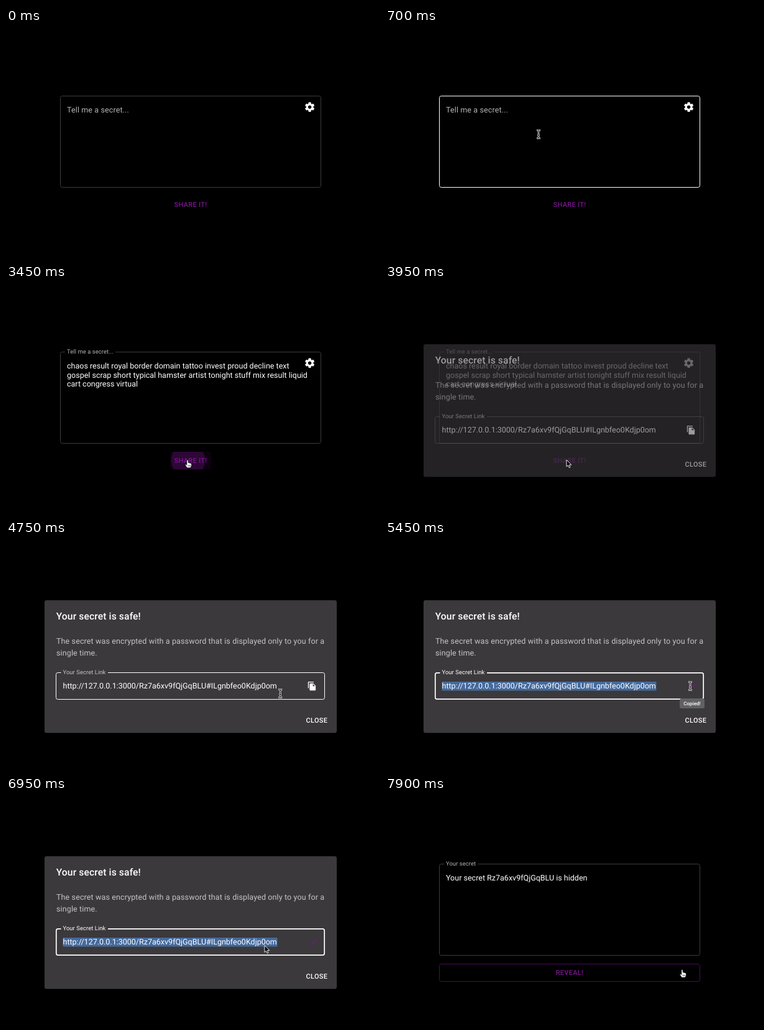
An HTML page for the animation above (8 s loop, 600x367 px).

```html
<!DOCTYPE html>
<html lang="en">
<head>
<meta charset="utf-8">
<title>Secret sharing</title>
<style>
html, body { margin: 0; width: 100%; height: 100%; overflow: hidden; background: #000; }
svg { display: block; width: 100%; height: 100%; }
text { font: 12.52px Roboto, Arial, sans-serif; fill: #fff; text-rendering: geometricPrecision; white-space: pre; }
.body { letter-spacing: .117px; fill-opacity: .7; }
.label { font-size: 9.39px; letter-spacing: .088px; }
.soft { fill-opacity: .7; }
.title { font-size: 15.64px; font-weight: 500; letter-spacing: .117px; }
.button { font-size: 10.95px; font-weight: 500; letter-spacing: .313px; }
.tip { font-size: 8px; font-weight: 500; }
.menu { font: 10.5px Inter, Roboto, sans-serif; }
.purple { fill: #7b1591; }
.mid { text-anchor: middle; }
.line { fill: none; }
</style>
</head>
<body>
<svg viewBox="0 0 600 367">
  <defs>
    <clipPath id="shareBox"><rect x="264" y="270" width="66" height="28.5" rx="3"/></clipPath>
    <path id="tooth" d="M-2.1-9.5H2.1L2.7-6H-2.7Z" fill="#fff" stroke="#fff" stroke-width=".7" stroke-linejoin="round"/>
  </defs>

  <g id="form">
    <path id="box" class="line"/>
    <text id="boxLabel" x="98">Tell me a secret...</text>
    <g id="secret">
      <text x="98" y="135.6">chaos result royal border domain tattoo invest proud decline text</text>
      <text x="98" y="150.5">gospel scrap short typical hamster artist tonight stuff mix result liquid</text>
      <text x="98" y="165.4">cart congress virtual</text>
    </g>
    <rect id="caret" width="1" height="14.5" fill="#fff"/>
    <g id="gear" transform="translate(488.6 127.2) scale(.782)">
      <circle r="5.4" fill="none" stroke="#fff" stroke-width="3.8"/>
    </g>
    <g clip-path="url(#shareBox)">
      <rect id="shareHover" x="264" y="270" width="66" height="28.5" fill="#7b1591" fill-opacity=".1"/>
      <circle id="ripple" cx="293" cy="284" fill="#7b1591"/>
    </g>
    <text class="button purple mid" x="297" y="287.9">SHARE IT!</text>
  </g>

  <g id="reveal">
    <path id="hiddenBox" class="line" stroke="#3c3c3c"/>
    <text class="label soft" x="98" y="112.3">Your secret</text>
    <text x="98" y="135.6">Your secret Rz7a6xv9fQjGqBLU is hidden</text>
    <rect x="87.5" y="270.5" width="419" height="28" rx="3" fill="none" stroke="#4b0d59"/>
    <text class="button purple mid" x="297" y="288.1">REVEAL!</text>
  </g>

  <rect id="shade" width="600" height="367"/>
  <g id="dialog">
    <rect x="62" y="97" width="470" height="213.5" rx="3" fill="#3b393c"/>
    <text class="title" x="80.7" y="128">Your secret is safe!</text>
    <text class="body" x="81" y="167.3">The secret was encrypted with a password that is displayed only to you for a</text>
    <text class="body" x="81" y="186.1">single time.</text>
    <path id="link" class="line"/>
    <text id="linkLabel" class="label" x="91.5" y="216.4">Your Secret Link</text>
    <rect id="mark" x="91.5" y="228" width="345" height="14.5" fill="#456a9c"/>
    <text x="91.5" y="239.4">http://127.0.0.1:3000/Rz7a6xv9fQjGqBLU#ILgnbfeo0Kdjp0om</text>
    <path id="copy" transform="translate(484.5 227.4) scale(.65)" fill="#fff" d="M16 1H4c-1.1 0-2 .9-2 2v14h2V3h12V1zm-1 4l6 6v10c0 1.1-.9 2-2 2H8c-1.1 0-2-.9-2-2V7c0-1.1.9-2 2-2h7zm-1 7h5.5L14 6.5V12z"/>
    <path id="check" transform="translate(486 227.7) scale(.65)" class="purple" d="M9 16.2L4.8 12l-1.4 1.4L9 19 21 7l-1.4-1.4z"/>
    <g id="tooltip">
      <rect x="474" y="255" width="40" height="16" rx="3" fill="#616062"/>
      <text class="tip mid" x="494" y="266">Copied!</text>
    </g>
    <text class="button" x="482.6" y="294">CLOSE</text>
  </g>

  <g id="menu">
    <rect x="379.5" y="229.5" width="240" height="160" rx="5" fill="#2c2b2e" stroke="#59585b"/>
    <rect id="menuRow" x="383" y="234" width="230" height="18" rx="3" fill="#2a62c4"/>
    <text class="menu" x="392" y="247">Open Link in New Tab</text>
    <text class="menu" x="392" y="267">Open Link in New Window</text>
    <path d="M390 277.5H600" stroke="#4b4a4d"/>
    <text class="menu" x="392" y="293">Copy</text>
    <text class="menu" x="392" y="313">Paste</text>
    <text class="menu" x="392" y="333">Select All</text>
  </g>

  <g id="cursor">
    <path id="arrow" d="M0 0V11L2.5 8.8 4.2 12.7 6 11.9 4.3 8.1H7.8Z" fill="#000" stroke="#fff" stroke-width=".9"/>
    <g id="beam" fill="none">
      <path d="M-3-6.5Q0-6.5 0-5V5Q0 6.5-3 6.5M3-6.5Q0-6.5 0-5M0 5Q0 6.5 3 6.5M-1.8 1.5H1.8" stroke="#fff" stroke-width="2.6"/>
      <path d="M-2.5-6.5Q0-6.5 0-5V5Q0 6.5-2.5 6.5M2.5-6.5Q0-6.5 0-5M0 5Q0 6.5 2.5 6.5M-1.3 1.5H1.3" stroke="#000"/>
    </g>
    <g id="hand" stroke="#000" stroke-width=".6">
      <path d="M-1.1.8Q0-.6 1.1.8V4.6L2.9 4.9 4.7 5.4 6.3 6.3V9.6L5 12.8H-.8L-3.6 8.2Q-3.6 6.8-2.2 7.4L-1.1 8.4Z" fill="#fff"/>
      <path d="M1.1 8.2V10.8M2.8 8.2V10.8M4.4 8.2V10.8"/>
    </g>
  </g>
</svg>

<script>
const LOOP = 8000, STEP = 50;
const el = id => document.getElementById(id);
const set = (id, attrs) => { for (const k in attrs) el(id).setAttribute(k, attrs[k]); };
const show = (id, on) => set(id, { visibility: on ? "inherit" : "hidden" });
const ramp = (t, from, to) => Math.min(1, Math.max(0, (t - from) / (to - from)));
const smooth = p => p * p * (3 - 2 * p);
const mix = (a, b, p) => a + (b - a) * p;
const within = (t, from, to) => t >= from && t < to;

// time, x, y of the pointer's hot spot
const TRACK = [
  [50, 236, 275], [700, 247, 171], [2450, 247, 171], [2500, 253, 179], [3250, 292, 283],
  [4400, 292, 283], [5100, 491, 235], [6050, 491, 235], [6550, 379, 229], [6600, 379, 229],
  [6900, 416, 240.5], [7100, 416, 240.5], [7650, 479, 279], [7900, 478, 279.3]
];
const POINTERS = [
  [0, ""], [50, "arrow"], [150, "beam"], [2900, "arrow"], [3000, "hand"], [3850, "arrow"],
  [4650, "beam"], [4950, "hand"], [5250, "beam"], [6600, "arrow"], [7150, "beam"],
  [7250, "arrow"], [7900, "hand"]
];

function pointerAt(t) {
  const i = TRACK.findIndex(k => k[0] > t);
  if (i === 0) return TRACK[0].slice(1);
  if (i < 0) return TRACK[TRACK.length - 1].slice(1);
  const [a, b] = [TRACK[i - 1], TRACK[i]];
  const p = 1 - (1 - ramp(t, a[0], b[0])) ** 2;
  return [mix(a[1], b[1], p), mix(a[2], b[2], p)];
}

// rounded outline with a gap in its top edge
function outline(x, y, w, h, gapFrom, gapTo, inset = 0) {
  const l = x + inset, t = y + inset, r = x + w - inset, b = y + h - inset, c = 3;
  return `M${gapTo} ${t}H${r - c}Q${r} ${t} ${r} ${t + c}V${b - c}Q${r} ${b} ${r - c} ${b}` +
    `H${l + c}Q${l} ${b} ${l} ${b - c}V${t + c}Q${l} ${t} ${l + c} ${t}H${gapFrom}`;
}

function edge(id, rect, gap, focused, hovered) {
  set(id, {
    d: outline(...rect, ...gap, focused ? .3 : 0),
    stroke: focused || hovered ? "#fff" : id === "link" ? "#686669" : "#3c3c3c",
    "stroke-width": focused ? 1.7 : 1
  });
}

function drawForm(t) {
  const up = smooth(ramp(t, 950, 1200));
  const focused = within(t, 1000, 3250);
  edge("box", [87.5, 109.5, 419, 147], [95, mix(95, 176, up)], focused, within(t, 150, 1000));
  const size = mix(12.52, 9.39, up);
  set("boxLabel", {
    y: mix(135.6, 112.3, up),
    style: `font-size:${size}px;letter-spacing:${size * .00938}px`,
    "fill-opacity": focused ? mix(.7, 1, up) : .7
  });
  const filled = t >= 2000;
  show("secret", filled);
  set("caret", { x: filled ? 212.3 : 98, y: filled ? 153.7 : 123.8 });
  show("caret", within(t, 1100, 1650) || within(t, 2000, 2200) || within(t, 2700, 3200));
  show("shareHover", within(t, 3000, 3850));
  const wave = ramp(t, 3250, 3600);
  set("ripple", { r: 45 * smooth(wave), "fill-opacity": .3 * (1 - ramp(t, 3450, 3850)) });
}

function drawDialog(t) {
  const alpha = smooth(ramp(t, 3835, 4035));
  set("shade", { "fill-opacity": alpha * .5 });
  set("dialog", { opacity: alpha });
  const focused = t >= 5250;
  edge("link", [80.5, 213.5, 432, 43], [88.5, 164], focused, within(t, 4650, 5250));
  set("linkLabel", { "fill-opacity": focused ? 1 : .7 });
  show("mark", focused);
  const copied = within(t, 5250, 7400);
  show("copy", !copied);
  show("check", copied);
  set("tooltip", { opacity: ramp(t, 5250, 5400) * (1 - ramp(t, 5750, 5950)) });
}

function draw(t) {
  const sharing = t < 7800;
  show("form", t < 4100);
  show("dialog", sharing && t >= 3850);
  show("shade", sharing && t >= 3850);
  show("reveal", t >= 7900);
  show("menu", within(t, 6600, 6950));
  show("menuRow", t >= 6700 && t < 6950);
  drawForm(t);
  drawDialog(t);
  const kind = POINTERS.filter(k => k[0] <= t).pop()[1];
  for (const id of ["arrow", "beam", "hand"]) show(id, id === kind);
  set("cursor", { transform: `translate(${pointerAt(t)})` });
}

for (let a = 0; a < 360; a += 60) {
  const tooth = document.createElementNS("http://www.w3.org/2000/svg", "use");
  tooth.setAttribute("href", "#tooth");
  tooth.setAttribute("transform", `rotate(${a})`);
  el("gear").append(tooth);
}
set("hiddenBox", { d: outline(87.5, 109.5, 419, 147, 95, 149) });

const start = performance.now();
function tick() {
  const t = (performance.now() - start) % LOOP;
  draw(Math.floor(t / STEP) * STEP);
  requestAnimationFrame(tick);
}
tick();
</script>
</body>
</html>
```
